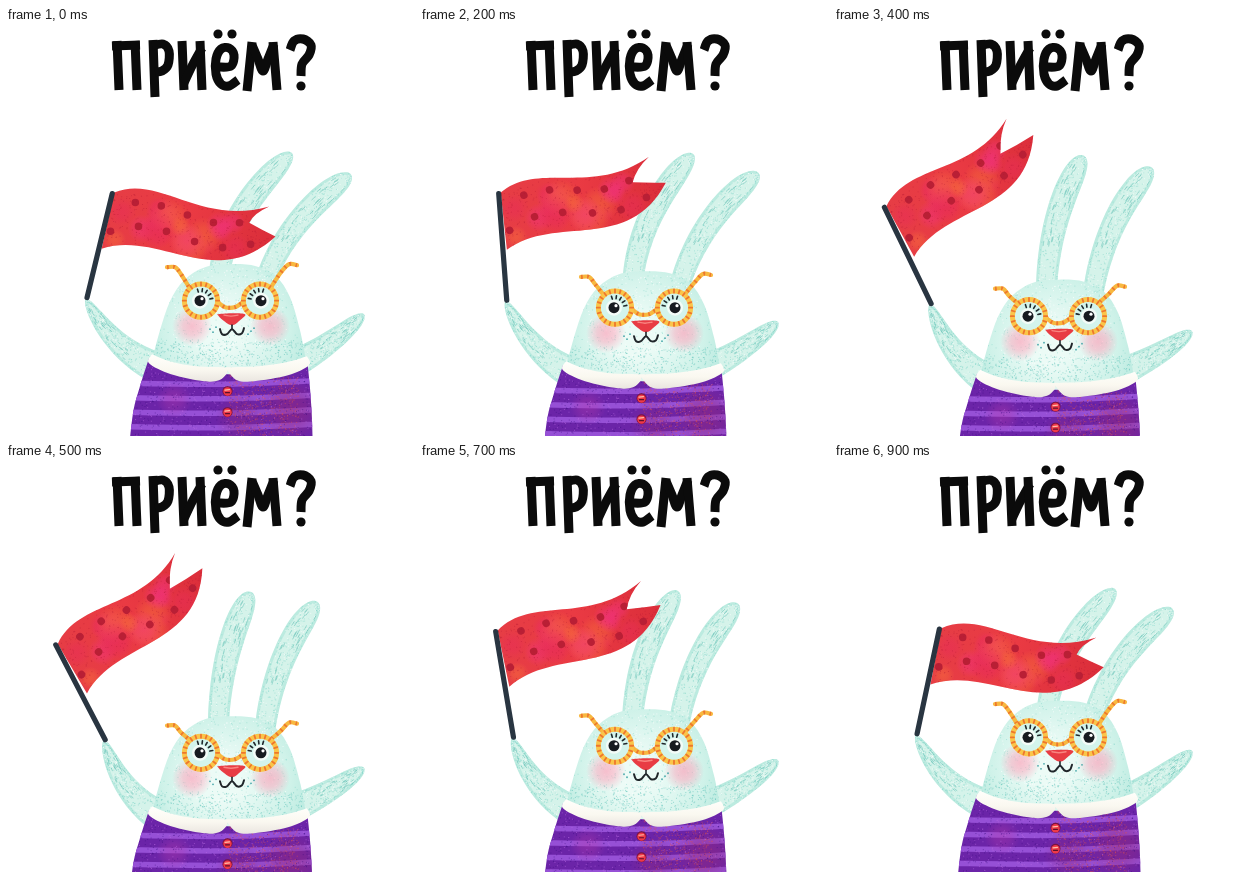
An HTML page with a canvas for the animation above (1000 ms loop, 408 px wide and 408 px high).

```html
<!DOCTYPE html>
<html lang="ru">
<head>
<meta charset="utf-8">
<title>приём?</title>
<style>
html, body { margin: 0; width: 100%; height: 100%; overflow: hidden; background: #fff; }
canvas { display: block; width: 408px; height: 408px; }
</style>
</head>
<body>
<canvas id="stage" width="408" height="408" role="img">приём?</canvas>
<script>
const ctx = document.getElementById('stage').getContext('2d');
const TAU = Math.PI * 2;
const STEPS = 10;

// One smooth swing per loop; parts follow each other by their lag.
const swing = (t, lag, size) => size * (1 - Math.cos(TAU * (t - lag))) / 2;
const mix = (a, b, k) => a + (b - a) * k;

let seed = 1;
function rnd() {
  seed = (seed * 16807) % 2147483647;
  return seed / 2147483647;
}

// Smooth run through flat x,y pairs, added to the current path.
function run(p, move) {
  const n = p.length / 2;
  const at = i => { i = Math.max(0, Math.min(n - 1, i)); return [p[2 * i], p[2 * i + 1]]; };
  if (move) ctx.moveTo(p[0], p[1]); else ctx.lineTo(p[0], p[1]);
  for (let i = 0; i < n - 1; i++) {
    const a = at(i - 1), b = at(i), c = at(i + 1), d = at(i + 2);
    ctx.bezierCurveTo(b[0] + (c[0] - a[0]) / 6, b[1] + (c[1] - a[1]) / 6,
      c[0] - (d[0] - b[0]) / 6, c[1] - (d[1] - b[1]) / 6, c[0], c[1]);
  }
}

function shape(fill, ...runs) {
  ctx.beginPath();
  runs.forEach((r, i) => run(r, i === 0));
  ctx.closePath();
  ctx.fillStyle = fill;
  ctx.fill();
}

function line(color, width, ...p) {
  ctx.beginPath();
  run(p, true);
  ctx.strokeStyle = color;
  ctx.lineWidth = width;
  ctx.stroke();
}

function disc(x, y, r, fill) {
  ctx.beginPath();
  ctx.arc(x, y, r, 0, TAU);
  ctx.fillStyle = fill;
  ctx.fill();
}

function glow(x, y, r, rgb, alpha) {
  const g = ctx.createRadialGradient(x, y, 0, x, y, r);
  g.addColorStop(0, `rgba(${rgb},${alpha})`);
  g.addColorStop(.45, `rgba(${rgb},${alpha * .75})`);
  g.addColorStop(1, `rgba(${rgb},0)`);
  disc(x, y, r, g);
}

function ramp(x0, y0, x1, y1, ...colors) {
  const g = ctx.createLinearGradient(x0, y0, x1, y1);
  colors.forEach((c, i) => g.addColorStop(i / (colors.length - 1), c));
  return g;
}

function grain(n, x, y, w, h, color) {
  ctx.fillStyle = color;
  for (let i = 0; i < n; i++) ctx.fillRect(x + rnd() * w, y + rnd() * h, 1, 1);
}

// Runs paint() inside the last path.
function inside(paint) {
  ctx.save();
  ctx.clip();
  paint();
  ctx.restore();
}

// Furry limb along a quadratic curve: half width w, changing by grow, round tip.
function limb([ax, ay], [bx, by], [cx, cy], w, grow) {
  const spot = (u, side) => {
    const v = 1 - u;
    const dx = v * (bx - ax) + u * (cx - bx), dy = v * (by - ay) + u * (cy - by);
    const d = Math.hypot(dx, dy);
    const h = side * w * (1 + grow * (u - .5)) * Math.sqrt(1 - u ** 8);
    return [v * v * ax + 2 * u * v * bx + u * u * cx - dy / d * h,
      v * v * ay + 2 * u * v * by + u * u * cy + dx / d * h];
  };
  const n = 10, edge = [];
  for (let i = -n; i <= n; i++) {
    const u = Math.sin((1 - Math.abs(i) / n) * TAU / 4);
    edge.push(...spot(u, i < 0 ? -1 : 1));
  }
  shape('#d5f3ea', edge);
  inside(() => {
    line('rgba(140,218,204,.35)', 6, ...edge);
    seed = 17;
    for (let i = 0; i < 400; i++) {
      const [x, y] = spot(rnd(), rnd() * 2 - 1);
      ctx.fillStyle = i % 3 ? 'rgba(90,200,185,.35)' : 'rgba(255,255,255,.6)';
      ctx.fillRect(x, y, 1, 1);
    }
    for (let i = 0; i < 40; i++) {
      const u = .3 + rnd() * .62, side = rnd() * 1.5 - .75;
      line('rgba(105,196,184,.6)', 1, ...spot(u, side), ...spot(u + .03, side));
    }
  });
}

function flag(k, shift) {
  const deg = Math.PI / 180, tilt = 14 - 39.5 * k, a = tilt * deg;
  const bx = 81 + 17.5 * shift, by = 269.5 + 6 * k;
  const tx = bx + 107 * Math.sin(a), ty = by - 107 * Math.cos(a);
  const wave = x => 8 + 11 * Math.sin((x - 68) * .035);
  ctx.save();
  ctx.translate(tx + 2, ty - 1);
  ctx.rotate((tilt - 14 - 2 * k) * deg);
  const x1 = 155 - 7 * k, x2 = 161 - 4 * k;
  ctx.beginPath();
  ctx.moveTo(0, 0);
  ctx.bezierCurveTo(45, -18, 85, 34, x1, 15);
  ctx.quadraticCurveTo(x1 - 16, 22, 135 - 15 * k, 31 + 6 * k);
  ctx.quadraticCurveTo(147 - 8 * k, 38 + 4 * k, x2, 45);
  ctx.bezierCurveTo(100, 100, 45, 38, -13, 56);
  ctx.closePath();
  ctx.fillStyle = ramp(0, 0, 150, 45, '#e63d45', '#ea3a43', '#dc2f3b');
  ctx.fill();
  inside(() => {
    const tones = ['246,105,60', '240,50,125', '232,45,88'];
    seed = 7;
    for (let i = 0; i < 18; i++) {
      const x = rnd() * 130;
      glow(x, wave(x) + 10 + rnd() * 40, 8 + rnd() * 12, tones[i % 3], .55);
    }
    for (let row = 0; row < 2; row++) {
      for (let i = 0; i < 6; i++) {
        const x = 21 + i * 26 - row * 25 + row * i * 2;
        disc(x, wave(x) + 13 + row * 24, 3.8, '#b91f35');
      }
    }
    grain(500, -15, 0, 175, 70, 'rgba(175,20,50,.35)');
  });
  ctx.restore();
  line('#293541', 5.2, bx, by, tx, ty);
}

function sweater() {
  shape('#6b24a8', [143, 330, 134, 358, 127, 385, 122, 430],
    [307, 430, 306, 392, 304, 360, 301, 330]);
  inside(() => {
    for (let i = 0; i < 5; i++) {
      const y = 354 + i * 14.5;
      line('#9650d6', 5.5, 115, y + 1, 222, y + 2, 320, y - 2);
    }
    glow(285, 382, 32, '150,40,120', .5);
    glow(235, 390, 26, '140,40,130', .45);
    glow(168, 372, 18, '190,60,170', .35);
    seed = 43;
    grain(500, 222, 345, 70, 70, 'rgba(225,80,80,.55)');
    grain(600, 120, 335, 190, 80, 'rgba(60,15,130,.45)');
    grain(400, 120, 335, 190, 80, 'rgba(190,110,230,.5)');
  });
  for (const y of [363, 384]) {
    disc(221.5, y, 5, '#7a123f');
    disc(221.5, y + .4, 4.2, '#ef3a49');
    line('#ffc0a8', 1.2, 219, y - 1, 223.5, y - 1.5);
    line('#5c1029', 1.2, 219.5, y + 1.5, 223.5, y + 1.5);
  }
}

function head() {
  const g = ctx.createRadialGradient(215, 300, 20, 225, 300, 100);
  g.addColorStop(0, '#ecfbf6');
  g.addColorStop(.55, '#cff2e9');
  g.addColorStop(1, '#a8e4d8');
  shape(g, [146, 332, 154, 302, 164, 273, 178, 252, 199, 239, 225, 236,
    250, 238, 270, 248, 284, 269, 294, 302, 300, 333], [300, 333, 262, 343, 222, 346, 184, 342, 146, 332]);
  inside(() => {
    seed = 61;
    grain(500, 145, 232, 155, 115, 'rgba(95,200,186,.35)');
    grain(400, 150, 312, 150, 32, 'rgba(80,190,180,.5)');
    grain(300, 165, 240, 115, 80, 'rgba(255,255,255,.7)');
    glow(186, 298, 20, '255,160,185', .65);
    glow(264, 298, 20, '255,160,185', .65);
  });
}

function collar() {
  const fill = ramp(0, 328, 0, 355, '#fffefa', '#faf8f0', '#e8e3de');
  shape(fill, [146, 326, 164, 333, 190, 338, 222, 339],
    [222, 339, 221, 345, 213, 352, 198, 353, 165, 346, 143, 335, 146, 326]);
  shape(fill, [222, 339, 252, 338, 280, 334, 301, 328],
    [301, 328, 303, 337, 282, 347, 248, 353, 231, 352, 222, 343]);
}

function lens(x, y, side) {
  disc(x, y, 16, '#d3f4ec');
  ctx.beginPath();
  ctx.arc(x, y, 16.6, 0, TAU);
  ctx.strokeStyle = '#fac54a';
  ctx.lineWidth = 5;
  ctx.stroke();
  const tick = (a, r0, r1, color, w) => line(color, w,
    x + Math.cos(a) * r0, y + Math.sin(a) * r0, x + Math.cos(a) * r1, y + Math.sin(a) * r1);
  for (let i = 0; i < 20; i++) tick(i / 20 * TAU, 15, 18.2, '#ee762d', 1.8);
  disc(x - side, y, 8, '#f3fcf8');
  disc(x - side, y, 5.5, '#171b20');
  disc(x - side + 2, y - 2, 1.6, '#fff');
  for (let i = 0; i < 5; i++) tick(side * (i * .42 - .3) - TAU / 4, 9, 12, '#20282c', 1.6);
}

function temple(p) {
  line('#f8b840', 4.2, ...p);
  ctx.setLineDash([1.8, 4.2]);
  ctx.lineCap = 'butt';
  line('#ed782e', 4, ...p);
  ctx.setLineDash([]);
  ctx.lineCap = 'round';
}

function face(k) {
  const d = 6 * k;
  temple([161, 239 + d, 169, 239 + d, 175, 246 + d, 183, 259]);
  temple([291, 237 + d, 283, 236 + d, 275, 244 + d, 265, 259]);
  temple([212, 274, 219, 279, 229, 279, 237, 274]);
  lens(195, 272.5, 1);
  lens(254, 272.5, -1);
  shape('#e83c44', [211, 286, 225, 285, 239, 286, 234, 292, 226, 297, 217, 292, 211, 286]);
  line('#f98580', 1.4, 218, 287, 225, 288, 232, 287);
  line('#20262a', 1.6, 226, 297, 226, 301);
  line('#20262a', 2, 214, 301, 216, 306, 221, 306, 226, 301, 231, 306, 236, 305, 238, 300);
  for (let i = 0; i < 6; i++) {
    const side = i < 3 ? -1 : 1;
    disc(226 + side * (16 + i % 3 * 3), 299 + (i * 5) % 8, .9, '#4ba9ac');
  }
}

function title() {
  const black = '#0b0b0b';
  const ink = (...p) => line(black, 9, ...p);
  const stem = (x, y0 = 13, y1 = 62) => ink(x, y0, x + 2, y1);
  ctx.lineCap = 'butt';
  stem(111);
  ink(106, 18, 134, 17);
  stem(129);
  stem(147, 12, 69);
  ink(146, 18, 157, 16, 163, 23, 162, 37, 156, 43, 149, 44);
  stem(176);
  ink(178, 55, 186, 38, 196, 20);
  stem(194);
  ink(212, 39, 225, 38, 228, 27, 223, 20, 215, 21, 210, 31, 210, 46, 215, 56, 223, 58, 232, 52);
  ink(241, 63, 246, 14);
  ink(246, 17, 252, 31, 257, 43, 262, 31, 268, 16);
  ink(267, 14, 271, 62);
  ink(284, 22, 288, 13, 297, 11, 305, 17, 303, 27, 296, 36, 295, 48);
  for (const [x, y] of [[212, 6], [226, 6], [295, 58]]) disc(x, y, 4.6, black);
  ctx.lineCap = 'round';
}

function draw(t) {
  const k = swing(t, -.03, 1.06);
  const left = swing(t, .01, 1.04);
  const right = swing(t, .05, 1);
  const drop = 15.5 * k;

  ctx.fillStyle = '#fff';
  ctx.fillRect(0, 0, 408, 408);
  ctx.lineCap = ctx.lineJoin = 'round';
  title();
  limb([212, 256 + drop], [mix(217, 213, left), 188], [mix(286, 247, left), mix(125, 128, left)], 12, .3);
  limb([258, 256 + drop], [mix(281, 267, right), 190], [mix(346, 311, right), mix(147, 138, right)], 12, .3);
  limb([152, 340 + drop * .7], [mix(107, 113, k), mix(322, 327, k)],
    [80 + 17.5 * left, 271 + 5 * k], 11, -.9);
  limb([288, 336 + drop * .5], [325, mix(317, 328, k)], [358, mix(286, 303, k)], 11, -.6);
  ctx.save();
  ctx.translate(0, drop);
  sweater();
  head();
  collar();
  face(k);
  ctx.restore();
  flag(k, left);
}

function tick() {
  const t = performance.now() % 1000 / 1000;
  draw(Math.floor(t * STEPS) / STEPS);
  requestAnimationFrame(tick);
}
tick();
</script>
</body>
</html>
```
